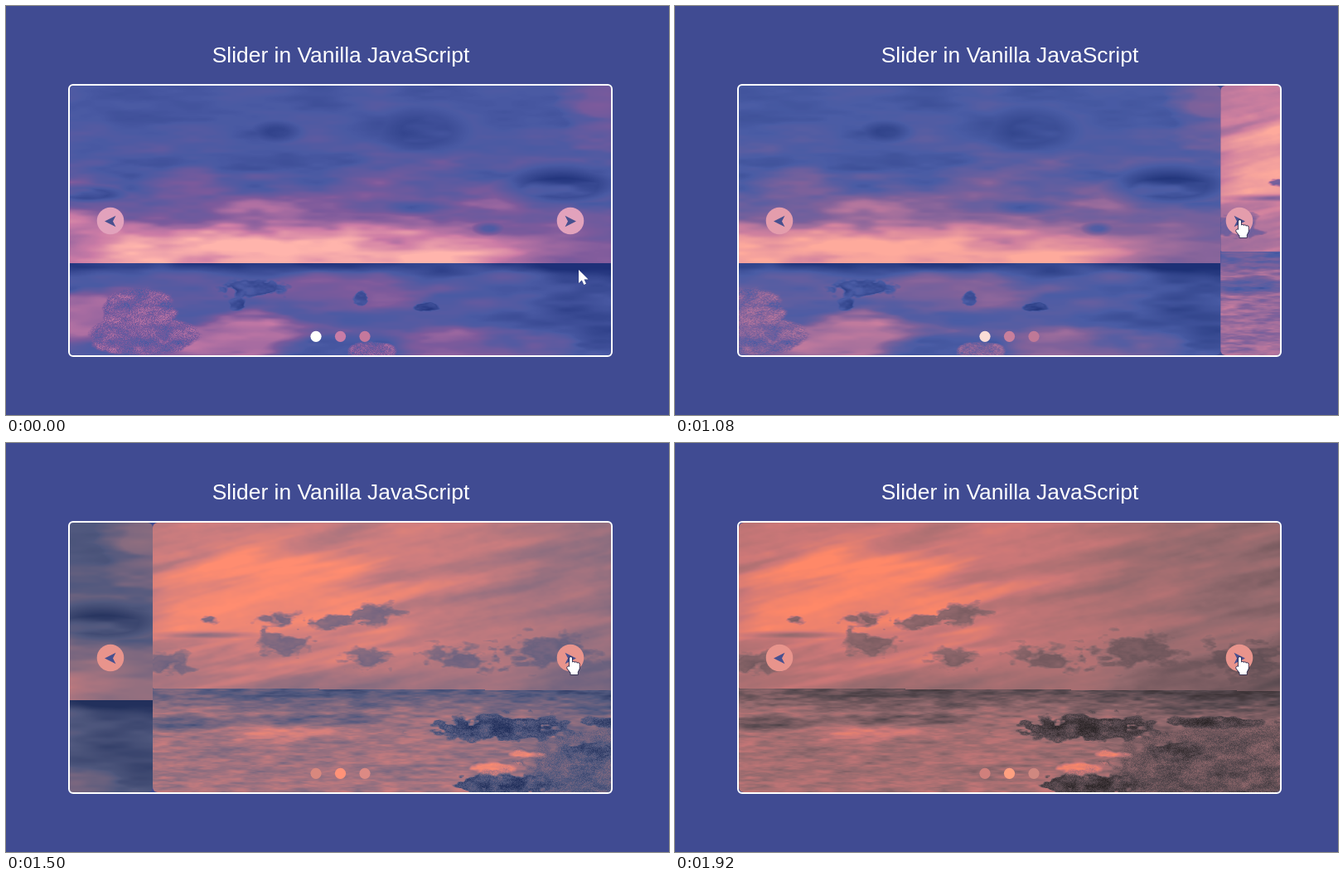
Recreate the animation shown at these times as an HTML page with a canvas. Size 800 px wide and 493 px high, loop 2.18 s.

```html
<!DOCTYPE html>
<html lang="en">
<head>
<meta charset="utf-8">
<title>Slider</title>
<style>
  html, body { margin: 0; width: 100%; height: 100%; overflow: hidden; background: #404b92; }
  body { position: relative; }
  canvas { position: absolute; left: 0; top: 0; display: block; }
  h1 {
    position: absolute; left: 8px; right: 0; top: 44px; margin: 0;
    font: 400 26.4px/30px "Liberation Sans", Arial, sans-serif;
    color: #fff; text-align: center; white-space: nowrap;
  }
</style>
</head>
<body>
<canvas id="stage" width="800" height="493"></canvas>
<h1>Slider in Vanilla JavaScript</h1>
<script>
const LOOP = 2180, TICK = 70, SLIDE_START = 1000;
const LEFT = 77, TOP = 96, W = 654, H = 326;
const ctx = document.getElementById('stage').getContext('2d');

const clamp = v => Math.max(0, Math.min(1, v));
const mix = (a, b, k) => a + (b - a) * k;
const smooth = (a, b, x) => { const k = clamp((x - a) / (b - a)); return k * k * (3 - 2 * k); };

// Seeded value noise
function hash(x, y) {
  let h = Math.imul(x, 374761393) ^ Math.imul(y, 668265263);
  h = Math.imul(h ^ (h >>> 13), 1274126177);
  return ((h ^ (h >>> 16)) >>> 0) / 4294967296;
}
function noise(x, y) {
  const ix = Math.floor(x), iy = Math.floor(y);
  const u = smooth(0, 1, x - ix), v = smooth(0, 1, y - iy);
  return mix(mix(hash(ix, iy), hash(ix + 1, iy), u),
             mix(hash(ix, iy + 1), hash(ix + 1, iy + 1), u), v);
}
function fbm(x, y) {
  let sum = 0;
  for (let i = 0, amp = .8; i < 3; i++, amp /= 2) {
    sum += (noise(x, y) - .5) * amp;
    x = x * 2 + 17; y = y * 2 + 31;
  }
  return sum;
}

// Soft ellipse: 1 inside, fading to 0 at its rim
function blob(x, y, cx, cy, rx, ry, rough = 0, hard = 1.8) {
  return clamp((1 - Math.hypot((x - cx) / rx, (y - cy) / ry) + rough) * hard);
}

// Each scene gives a tone from 0 (dark) to 1 (glowing) at a stage point
function dusk(x, y) {
  const streak = fbm(x / 75, y / 17), rough = fbm(x / 16, y / 9);
  const right = smooth(540, 730, x);
  const spot = (...shape) => blob(x, y, ...shape, streak * .6);
  if (y < 310) {
    return .25 + .5 * smooth(170, 300, y + streak * 50) * (1 - .5 * right)
      + .24 * spot(340, 308, 270, 50) + .2 * spot(735, 112, 75, 75) + streak * .13
      - .24 * spot(668, 217, 80, 27) - .25 * spot(100, 227, 60, 13) - .25 * spot(582, 268, 25, 10)
      - .15 * spot(500, 243, 60, 12) - .1 * spot(500, 150, 60, 30) - .1 * spot(325, 151, 32, 14);
  }
  const sea = .3 + streak * .2 - .2 * (1 - smooth(310, 328, y)) - .12 * right
    + .28 * spot(90, 370, 70, 38) + .34 * spot(265, 402, 130, 35)
    + .14 * spot(390, 347, 140, 26) + .22 * spot(560, 412, 130, 28);
  const mass = Math.max(blob(x, y, 160, 367, 46, 30, rough * .2, 9),
    blob(x, y, 165, 397, 68, 25, rough * .2, 9), blob(x, y, 441, 418, 30, 15, rough * .2, 9));
  const stones = Math.max(blob(x, y, 297, 340, 37, 11, rough, 5), blob(x, y, 280, 359, 11, 8, rough, 5),
    blob(x, y, 428, 352, 8, 9, rough, 5), blob(x, y, 507, 363, 19, 8, rough, 5));
  return mix(mix(sea, .47 + rough * .3 + (hash(x, y) - .5) * .22, mass), .17 + rough * .3, stones);
}

// Cloud key points: x, y, half width
const clouds = [
  [145, 213, 14], [232, 213, 28], [238, 241, 36], [295, 215, 30], [342, 205, 32],
  [337, 261, 30], [450, 260, 42], [555, 252, 58], [690, 262, 62], [92, 266, 36]
];

function shore(x, y) {
  const streak = fbm(x / 80 + y / 50, y / 18 + x / 120), rough = fbm(x / 14, y / 7);
  const right = smooth(350, 730, x);
  const spot = (...shape) => blob(x, y, ...shape, streak * .6);
  if (y < 295 + (x - LEFT) / 200) {
    const sky = .72 - .25 * right - .13 * smooth(230, 295, y)
      + .22 * spot(200, 200, 210, 80) + streak * .2 + rough * .04 - .22 * spot(150, 231, 85, 6);
    const cover = clouds.reduce((sum, [cx, cy, r]) => sum + blob(x, y, cx, cy, r, r * .42, rough * 1.3, 2), 0);
    return mix(sky, .36 + rough * .15 - .08 * right, clamp(cover) * .85);
  }
  const ripple = fbm(x / 18, y / 3.5);
  const sea = .3 + .29 * smooth(296, 338, y) - .14 * right + streak * .15 + ripple * .25
    - .28 * spot(110, 338, 70, 11) - .25 * spot(275, 334, 110, 10) + .15 * spot(260, 350, 150, 12);
  const grain = (hash(x, y) - .5) * .16;
  const sand = blob(x, y, 690, 395, 190, 62, rough * .5, 4);
  const rocks = Math.max(blob(x, y, 500, 342, 88, 17, rough, 4), blob(x, y, 605, 372, 34, 13, rough, 4),
    blob(x, y, 500, 410, 72, 14, rough, 4), blob(x, y, 650, 336, 60, 7, rough, 4));
  const land = mix(mix(sea, .32 + rough * .25 + grain, sand), .15 + rough * .35 + grain, rocks);
  return land + .4 * Math.max(blob(x, y, 525, 375, 24, 5, rough), blob(x, y, 492, 392, 36, 8, rough));
}

function makeSlide(scene) {
  const canvas = document.createElement('canvas');
  canvas.width = W; canvas.height = H;
  const pen = canvas.getContext('2d');
  const image = pen.createImageData(W, H);
  const tones = new Uint8Array(W * H)
    .map((_, i) => 255 * clamp(scene(LEFT + i % W, TOP + Math.floor(i / W))));
  return { canvas, pen, image, tones };
}
const slides = [makeSlide(dusk), makeSlide(shore)];

const parse = text => text.split(' ').map(hex => [0, 2, 4].map(i => parseInt(hex.slice(i, i + 2), 16)));
const blend = (a, b, k) => a.map((v, i) => mix(v, b[i], k));
const css = c => `rgb(${c.map(Math.round).join(',')})`;

// Ramp from dark to glowing, then button and dots
const moods = [
  [1000, '1e3078 4a5aa4 7c5a9c cc7ca6 ffb4ac', 'e2a2bc fffffc c87ca6 c4789c'],
  [1210, '1c3272 4a60a8 8a7298 d48890 fc967e', 'e8948c f2988e c88488 b47c8c'],
  [1490, '22305c 50587e 8e6e80 d07e7e ff8c70', 'e8948c d8887e ff9278 dc8a84'],
  [1910, '2c2628 584a50 946a6e cc7878 ff8868', 'e8948c d0807c ffa080 d08880']
].map(([time, ramp, parts]) => [time, [...parse(ramp), ...parse(parts)]]);

// Slide offset at key times
const travel = [[1000, [0]], [1210, [218]], [1350, [396]], [1490, [554]], [1630, [616]], [1910, [W]]];

// Calls use(a, b, k) with the two key values around time t
function between(keys, t, use) {
  let i = 0;
  while (i < keys.length - 2 && keys[i + 1][0] <= t) i++;
  const [t0, a] = keys[i], [t1, b] = keys[i + 1];
  return use(a, b, clamp((t - t0) / (t1 - t0)));
}

function tint(ramp) {
  const table = new Uint32Array(256).map((_, i) => {
    const pos = i / 255 * (ramp.length - 1);
    const low = Math.min(Math.floor(pos), ramp.length - 2);
    const [r, g, b] = blend(ramp[low], ramp[low + 1], pos - low);
    return (255 << 24) | (b << 16) | (g << 8) | r;
  });
  for (const { pen, image, tones } of slides) {
    const out = new Uint32Array(image.data.buffer);
    for (let i = 0; i < out.length; i++) out[i] = table[tones[i]];
    pen.putImageData(image, 0, 0);
  }
}

const arrow = new Path2D('M0 0V16L3.8 12.6L6.4 18L9 16.8L6.6 11.6H11.6Z');
const hand = new Path2D('M-2 10V1.5a1.5 1.5 0 0 1 3 0V7a1.5 1.5 0 0 1 3 .5a1.5 1.5 0 0 1 3 .7' +
  'a1.4 1.4 0 0 1 2.8 .8V14l-2 4v3H-.5v-2l-4-5a1.6 1.6 0 0 1 2.5-2z');
const chevron = new Path2D('M7 0L-6.5 -6.8L-3 0L-6.5 6.8Z');

function disc(x, y, r, fill) {
  ctx.fillStyle = fill;
  ctx.beginPath();
  ctx.arc(x, y, r, 0, Math.PI * 2);
  ctx.fill();
}
function box(x, y, w, h, r) {
  ctx.beginPath();
  ctx.roundRect(x, y, w, h, r);
}
function clipped(x, y, w, h, r, paint) {
  ctx.save();
  box(x, y, w, h, r);
  ctx.clip();
  paint();
  ctx.restore();
}
function at([x, y], paint) {
  ctx.save();
  ctx.translate(x, y);
  paint();
  ctx.restore();
}

function button(x, dir, fill) {
  disc(x, 259, 16.3, fill);
  at([x, 259.5], () => {
    ctx.scale(dir, 1);
    ctx.fillStyle = '#48508f';
    ctx.fill(chevron);
  });
}

const MOVES = 6, HOVER = 4;
function pointer(i) {
  const k = smooth(0, MOVES, i);
  return [mix(691, 682, k), mix(318, 258, k)];
}

// Ghosts the pointer leaves behind, coloured by sky or sea
function drawTrail(count) {
  const ghosts = fill => () => {
    ctx.fillStyle = fill;
    for (let i = 0; i < count; i++) at(pointer(i), () => ctx.fill(arrow));
  };
  clipped(LEFT, TOP, W, 214, 0, ghosts('rgba(108,104,190,.7)'));
  clipped(LEFT, 310, W, 112, 0, ghosts('rgba(46,94,168,.85)'));
}

function drawPointer(i) {
  const over = i >= HOVER, shape = over ? hand : arrow;
  at(pointer(i), () => {
    ctx.lineWidth = over ? 1.6 : .8;
    ctx.strokeStyle = over ? '#26264a' : 'rgba(40,50,110,.7)';
    ctx.stroke(shape);
    ctx.fillStyle = '#fff';
    ctx.fill(shape);
  });
}

let tinted;

function draw(t) {
  const tick = SLIDE_START + TICK * Math.max(0, Math.floor((t - SLIDE_START) / TICK));
  const [offset] = between(travel, tick, blend);
  const colours = between(moods, tick, (a, b, k) => a.map((c, i) => blend(c, b[i], k)));
  if (tinted !== tick) {
    tint(colours.slice(0, 5));
    tinted = tick;
  }

  ctx.fillStyle = '#404b92';
  ctx.fillRect(0, 0, 800, 493);
  clipped(LEFT, TOP, 653, 325, 4, () => slides.forEach(({ canvas }, i) => {
    const x = LEFT + i * W - offset;
    clipped(x, TOP, W, 325, 6, () => ctx.drawImage(canvas, x, TOP));
  }));
  ctx.strokeStyle = '#fff';
  ctx.lineWidth = 2;
  box(76, 95, 655, 327, 5);
  ctx.stroke();

  const [fill, ...dots] = colours.slice(5).map(css);
  button(126, -1, fill);
  button(681, 1, fill);
  dots.forEach((c, i) => disc(374 + i * 29.5, 398.3, 6.6, c));

  const moved = Math.min(MOVES, Math.floor(t / TICK));
  if (t < 1010) drawTrail(Math.min(moved, HOVER));
  drawPointer(moved);
  if (t >= 870 && t < 1010) disc(681.7, 258, 14.7, 'rgba(236,234,104,.85)');
}

let start;
function frame(now) {
  start ??= now;
  draw((now - start) % LOOP);
  requestAnimationFrame(frame);
}
draw(0);
requestAnimationFrame(frame);
</script>
</body>
</html>
```
